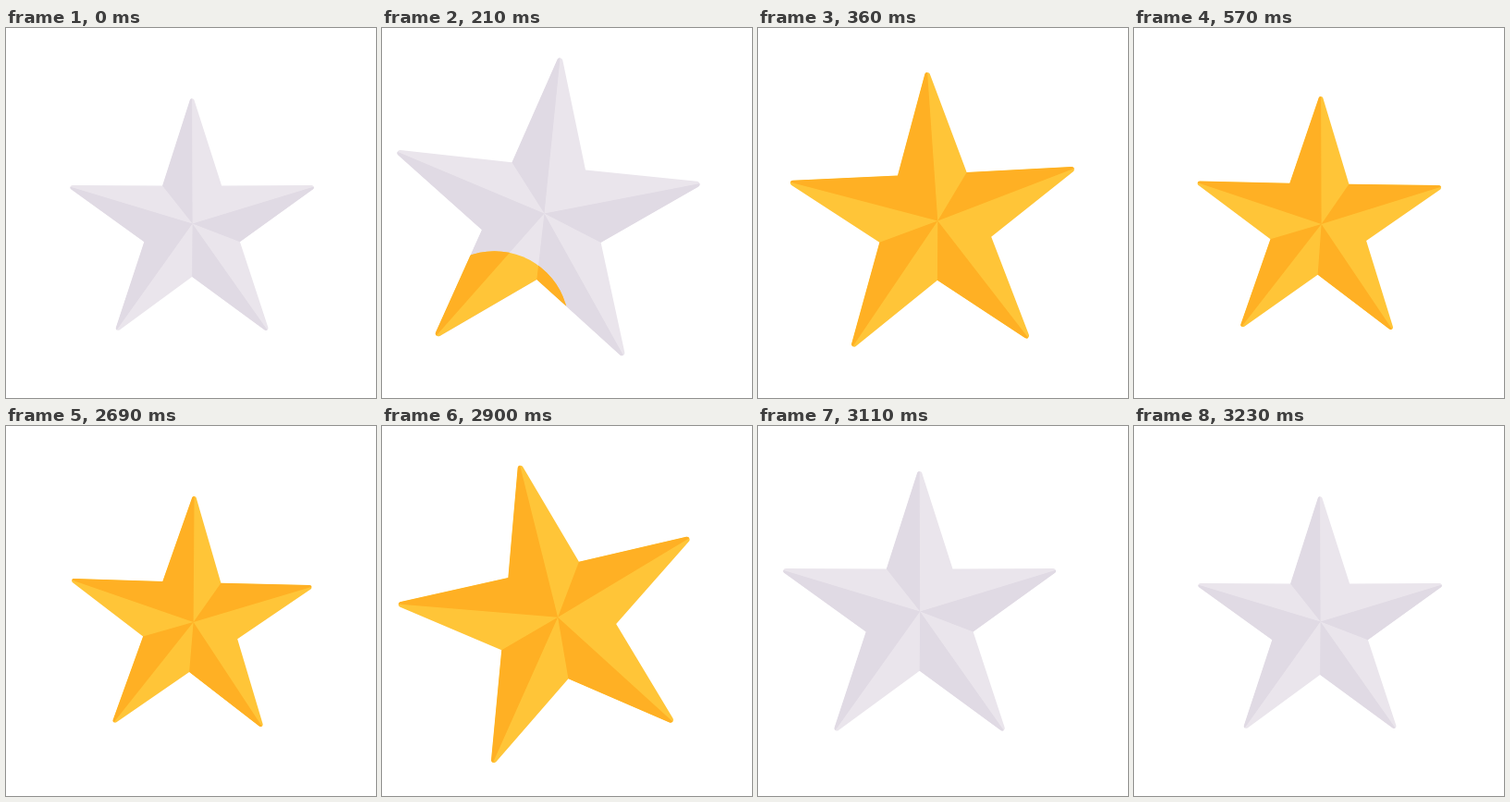
An HTML page with a canvas for the animation above (4260 ms loop, 400 by 400 pixels).

```html
<!DOCTYPE html>
<html lang="en">
<head>
<meta charset="utf-8">
<title>Star toggle</title>
<style>
  html, body { margin: 0; width: 100%; height: 100%; overflow: hidden; background: #fff; }
  canvas { display: block; width: 400px; height: 400px; }
</style>
</head>
<body>
<canvas id="stage" width="400" height="400"></canvas>
<script>
const ctx = document.getElementById('stage').getContext('2d');
const LOOP = 4260, STEP = 30, LAST = 19;
const FILL_END = 570, CLEAR_START = 2690, CLEAR_END = 3230;

const GREY = { light: '#eae5ec', dark: '#e0dae4' };
const GOLD = { light: '#ffc538', dark: '#ffb024' };

const TIP = 144, NOTCH = 54.5, TIP_RADIUS = 2.5, FULL_REVEAL = 310;
const darkFacets = [2, 4, 6, 7, 9];

// Regular star, clockwise from the top; the facets meet slightly above its middle.
const points = Array.from({ length: 10 }, (_, i) => {
  const angle = i * Math.PI / 5, r = i % 2 ? NOTCH : TIP;
  return [r * Math.sin(angle) - 0.5, 3 - r * Math.cos(angle)];
});

function starPath() {
  const path = new Path2D();
  path.moveTo(...points[9]);
  for (let i = 0; i < 10; i += 2) {
    path.arcTo(...points[i], ...points[i + 1], TIP_RADIUS);
    path.lineTo(...points[i + 1]);
  }
  path.closePath();
  return path;
}

function facetPath() {
  const path = new Path2D();
  for (const i of darkFacets) {
    path.moveTo(0, 0);
    path.lineTo(...points[i]);
    path.lineTo(...points[(i + 1) % 10]);
    path.closePath();
  }
  return path;
}

const outline = starPath(), shade = facetPath();

// Progress from 0 to 1 between steps a and b
const linear = (k, a, b) => Math.min(1, Math.max(0, (k - a) / (b - a)));
const easeOut = (k, a, b) => 1 - (1 - linear(k, a, b)) ** 2;
const ease = (k, a, b) => {
  const u = linear(k, a, b);
  return u * u * (3 - 2 * u);
};

// Leap aside and grow, turn by one tip, then fall back and settle
function pose(k) {
  const settle = linear(k, LAST - 1, LAST);
  return {
    shift: 28.5 * ease(k, 5.7, 15.5) - 27.5 * easeOut(k, 0, 5),
    size: 1 + 0.285 * ease(k, 0, 9) - 0.3 * ease(k, 9, 16) + 0.015 * settle,
    turn: 73.6 * ease(k, 5.7, 13.1) - 0.6 * settle
  };
}

function drawStar({ shift, size, turn }, paint) {
  ctx.save();
  ctx.translate(201.6 + shift, 211.5 + shift * 0.42);
  ctx.rotate(turn * Math.PI / 180);
  ctx.scale(size, size);
  ctx.fillStyle = paint.light;
  ctx.fill(outline);
  ctx.clip(outline);
  ctx.fillStyle = paint.dark;
  ctx.fill(shade);
  ctx.restore();
}

function draw(k) {
  const star = pose(k), radius = FULL_REVEAL * ease(k, 5, 11);
  ctx.clearRect(0, 0, 400, 400);
  if (radius < FULL_REVEAL) drawStar(star, GREY);
  ctx.save();
  ctx.beginPath();
  ctx.arc(121.5, 321.5, radius, 0, Math.PI * 2);
  ctx.clip();
  drawStar(star, GOLD);
  ctx.restore();
}

function stepAt(t) {
  if (t < FILL_END) return Math.floor(t / STEP);
  if (t < CLEAR_START) return LAST;
  if (t < CLEAR_END) return LAST - 1 - Math.floor((t - CLEAR_START) / STEP);
  return 0;
}

const start = performance.now();
function tick() {
  draw(stepAt((performance.now() - start) % LOOP));
  requestAnimationFrame(tick);
}
tick();
</script>
</body>
</html>
```
